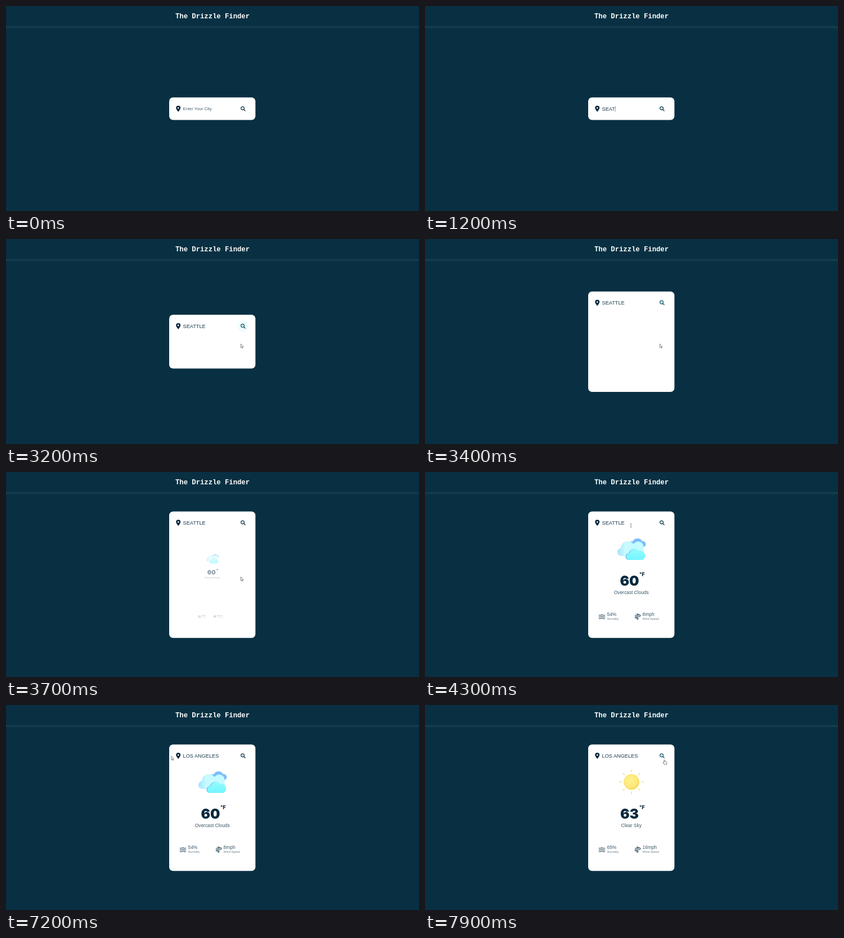
An HTML page for the animation above (8 s loop, 734 px wide and 366 px high).

```html
<!DOCTYPE html>
<html lang="en">
<head>
<meta charset="utf-8">
<title>Weather card</title>
<style>
  html, body { margin: 0; width: 100%; height: 100%; overflow: hidden; background: #083042; }
  svg { display: block; width: 100%; height: 100%; }
  text { font-family: "Liberation Sans", Arial, sans-serif; fill: #3c5868; white-space: pre; }
  .title { font: bold 12.22px "Liberation Mono", monospace; fill: #fff; }
  .city { font-size: 9.18px; fill: #1c3c4d; }
  .hint { font-size: 7.65px; fill: #4a6473; }
  .temp { font: 900 24.5px Inter, sans-serif; fill: #06283d; }
  .unit { font: 800 9.2px Inter, sans-serif; fill: #06283d; }
  .value { font-size: 8.4px; }
  .label { font-size: 5.36px; fill: #71858f; }
  .mid { text-anchor: middle; }
  .line { fill: none; stroke: #17394b; stroke-width: 1.15; stroke-linecap: round; stroke-linejoin: round; }
  .pointer { fill: #fff; stroke: #3e474d; stroke-width: .65; stroke-linejoin: round; }
</style>
</head>
<body>
<svg viewBox="0 0 734 366">
  <defs>
    <linearGradient id="band" x2="0" y2="1">
      <stop stop-color="#1a4050"/><stop offset="1" stop-color="#0b3345"/>
    </linearGradient>
    <linearGradient id="mist" x2="1" y2="0">
      <stop stop-color="#a5e2ff"/><stop offset=".3" stop-color="#c8faff"/><stop offset="1" stop-color="#c2fbff"/>
    </linearGradient>
    <linearGradient id="aqua" x2="0" y2="1">
      <stop stop-color="#92fcff"/><stop offset="1" stop-color="#74f5ff"/>
    </linearGradient>
    <radialGradient id="glow" cx=".42" cy=".4" r=".6">
      <stop stop-color="#fff08f"/><stop offset=".75" stop-color="#fde87b"/><stop offset="1" stop-color="#f7da5c"/>
    </radialGradient>
    <path id="puff" d="M363.5 157a6 6 0 0 1-.4-12 10 10 0 0 1 17.5-3.8A8.2 8.2 0 0 1 385 157z"/>
    <clipPath id="picked"><rect id="pickedArea" y="10" height="20"/></clipPath>
  </defs>

  <rect width="734" height="366" fill="#083042"/>
  <rect y="36" width="734" height="4.5" fill="url(#band)"/>
  <text class="title mid" x="367" y="22">The Drizzle Finder</text>

  <rect id="card" x="290" width="153.3" rx="6.9" fill="#fff"/>
  <g id="search">
    <path fill="#06283d" fill-rule="evenodd" d="M306.2 25.8C304.8 24 302.2 20.6 302.2 18.9a4 4 0 0 1 8 0c0 1.7-2.6 5.1-4 6.9zm0-8.3a1.4 1.4 0 1 0 0 2.8 1.4 1.4 0 0 0 0-2.8z"/>
    <text id="hint" class="hint" x="314.6" y="23">Enter Your City</text>
    <text id="city" class="city" x="314.6" y="23.6"></text>
    <g id="selection">
      <rect id="highlight" y="15" height="11" fill="#3390ff"/>
      <text id="cityPicked" class="city" x="314.6" y="23.6" style="fill:#fff" clip-path="url(#picked)"></text>
    </g>
    <rect id="caret" y="15.4" width=".6" height="10.2" fill="#44606e"/>
    <circle id="hover" cx="421.2" cy="20.2" r="10" fill="#eefcfd"/>
    <g id="lens" fill="none" stroke-width="1.25" stroke-linecap="round">
      <circle cx="420.5" cy="19.4" r="2.85"/><path d="M422.7 21.6l2.4 2.4"/>
    </g>
  </g>

  <g id="summary">
    <g id="clouds">
      <path fill="#7bbcfb" d="M368 134a5.2 5.2 0 0 1-.6-10.4 8 8 0 0 1 1.8.4 9.2 9.2 0 0 1 16.6-.6 5.4 5.4 0 0 1 2.2 10.6z"/>
      <path fill="url(#mist)" d="M348.6 150a7.2 7.2 0 0 1-.6-14.3 12.4 12.4 0 0 1 22.6-7A9.6 9.6 0 0 1 388.4 134v16z"/>
      <path fill="#fff" d="M384 128h9v12h-6z" opacity="0"/>
      <use href="#puff" x="-.8" fill="#5baef0"/>
      <use href="#puff" x=".3" fill="url(#aqua)"/>
    </g>
    <g id="sun">
      <circle cx="367" cy="137.3" r="13.6" fill="url(#glow)" stroke="#f5d95d" stroke-width=".6"/>
      <g id="rays" stroke="#fbe47b" stroke-width="1.7" stroke-linecap="round"></g>
    </g>
    <text id="temp" class="temp mid" x="363.5" y="203.2"></text>
    <text class="unit" x="381" y="186.4">°F</text>
    <text id="sky" class="value mid" x="366.7" y="218.2"></text>
  </g>

  <g id="details">
    <g id="waves" class="line"></g>
    <text id="humidity" class="value" x="323.5" y="257"></text>
    <text class="label" x="323.5" y="263.8">Humidity</text>
    <path class="line" d="M373.3 256h4.2a1.3 1.3 0 1 0-1.2-1.9M373.3 258.2h7.6a1.7 1.7 0 1 0-1.6-2.4M373.3 260.4h4.2a1.3 1.3 0 1 1-1.2 1.9"/>
    <text id="wind" class="value" x="386.6" y="257"></text>
    <text class="label" x="386.6" y="263.8">Wind Speed</text>
  </g>

  <g id="pointer">
    <path id="arrow" class="pointer" d="M.3 .3V7.2L1.9 5.8 2.9 8 4 7.5 3 5.4H5z"/>
    <path id="hand" class="pointer" d="M-.7.8q.7-1 1.4 0V3.2l3 .8q.8.4.7 1.4L3.8 8.6H-.4L-2.6 5.3q.2-1 1.1-.4l.8.7z"/>
    <path id="beam" fill="none" stroke="#59656c" stroke-width=".7" d="M-1.4-2.6Q0-2.6 0-2Q0-2.6 1.4-2.6M0-2V3.2M-1.4 3.6Q0 3.6 0 3Q0 3.6 1.4 3.6"/>
  </g>
</svg>

<script>
const LOOP = 8000, STEP = 100, CENTER_Y = 183.3, TEXT_X = 314.6;
const $ = id => document.getElementById(id);
const set = (id, attrs) => { for (const k in attrs) $(id).setAttribute(k, attrs[k]); };
const show = (id, on) => { $(id).style.display = on ? '' : 'none'; };
const latest = (rows, t) => rows.filter(row => row[0] <= t).pop();

// Linear blend of [time, value] rows.
function blend(rows, t, col = 1) {
  const i = rows.findIndex(row => row[0] > t);
  if (i < 0) return rows[rows.length - 1][col];
  if (i === 0) return rows[0][col];
  const a = rows[i - 1], b = rows[i];
  return a[col] + (b[col] - a[col]) * (t - a[0]) / (b[0] - a[0]);
}

const typing = [
  [0, '', false], [900, 'S', true], [1200, 'SEAT', true], [1500, 'SEATT', true],
  [1600, 'SEATTL', true], [1700, 'SEATTLE', false], [5200, 'L', true],
  [6000, 'LOS ', true], [6100, 'LOS A', true], [6200, 'LOS AN', true],
  [6300, 'LOS ANG', true], [6600, 'LOS ANGELE', true], [6700, 'LOS ANGELES', false]
];
const height = [[3000, 40.2], [3100, 65], [3200, 96], [3300, 139], [3400, 179.3],
  [3500, 207], [3600, 223], [3700, 225.7]];
const pointer = [
  [2300, 385, 7, 'arrow'], [2800, 417, 187, 'hand'], [3200, 417, 187, 'arrow'],
  [4000, 417, 187, 'arrow'], [4300, 366, 95, 'beam'], [4400, 366, 95, 'beam'],
  [4800, 293.5, 92, 'arrow'], [7100, 293.5, 92, 'arrow'], [7200, 293.5, 91, 'arrow'],
  [7400, 293.5, 91, 'arrow'], [7600, 448, 92, 'arrow'], [7700, 425.5, 97.5, 'hand']
];
const hover = [[2700, 0], [2900, 1], [3200, 1], [3400, 0]];
const reports = [
  [0, '60', 'Overcast Clouds', '54%', '8mph'],
  [7800, '63', 'Clear Sky', '65%', '16mph']
];

$('rays').innerHTML = Array.from({ length: 8 }, (_, i) =>
  `<path d="M367 119.4v-3.2" transform="rotate(${i * 45} 367 137.3)"/>`).join('');
$('waves').innerHTML = [255.4, 258.4, 261.4].map(y =>
  `<path d="M309.3 ${y}q1.7 1.3 3.4 0t3.4 0t3.4 0"/>`).join('');

function drawSearch(t, top) {
  const [, text, caret] = latest(typing, t);
  set('search', { transform: `translate(0 ${top})` });
  $('city').textContent = $('cityPicked').textContent = text;
  show('hint', !text);
  show('caret', caret);
  const end = TEXT_X + (text ? $('city').getComputedTextLength() : 0);
  if (caret) set('caret', { x: end });

  const selecting = t >= 4500 && t < 5200;
  show('selection', selecting);
  if (selecting) {
    const x = Math.min(end, Math.max(TEXT_X, blend(pointer, t)));
    for (const id of ['highlight', 'pickedArea']) set(id, { x, width: end - x });
  }
  set('hover', { opacity: blend(hover, t) });
  const active = (t >= 2800 && t < 3700) || t >= 7700;
  set('lens', { stroke: active ? '#0d5565' : '#12384b' });
}

function drawReport(t) {
  const p = Math.min(1, Math.max(0, (t - 3600) / 500));
  const grown = 1 - (1 - p) ** 2.6;
  for (const [id, y] of [['summary', 168], ['details', 258]]) {
    show(id, p > 0);
    set(id, { opacity: grown, transform: `translate(366.7 ${y}) scale(${grown}) translate(-366.7 ${-y})` });
  }
  const [since, ...values] = latest(reports, t);
  ['temp', 'sky', 'humidity', 'wind'].forEach((id, i) => { $(id).textContent = values[i]; });
  show('clouds', !since);
  show('sun', since);
}

function drawPointer(t) {
  const key = latest(pointer, t);
  show('pointer', key);
  if (!key) return;
  for (const id of ['arrow', 'hand', 'beam']) show(id, id === key[3]);
  set('pointer', { transform: `translate(${blend(pointer, t)} ${blend(pointer, t, 2)})` });
}

function render(t) {
  const h = blend(height, t), top = CENTER_Y - h / 2;
  set('card', { y: top, height: h });
  drawSearch(t, top);
  drawReport(t);
  drawPointer(t);
}

const start = performance.now();
function tick() {
  const t = (performance.now() - start) % LOOP;
  render(Math.floor(t / STEP) * STEP);
  requestAnimationFrame(tick);
}
tick();
</script>
</body>
</html>
```
